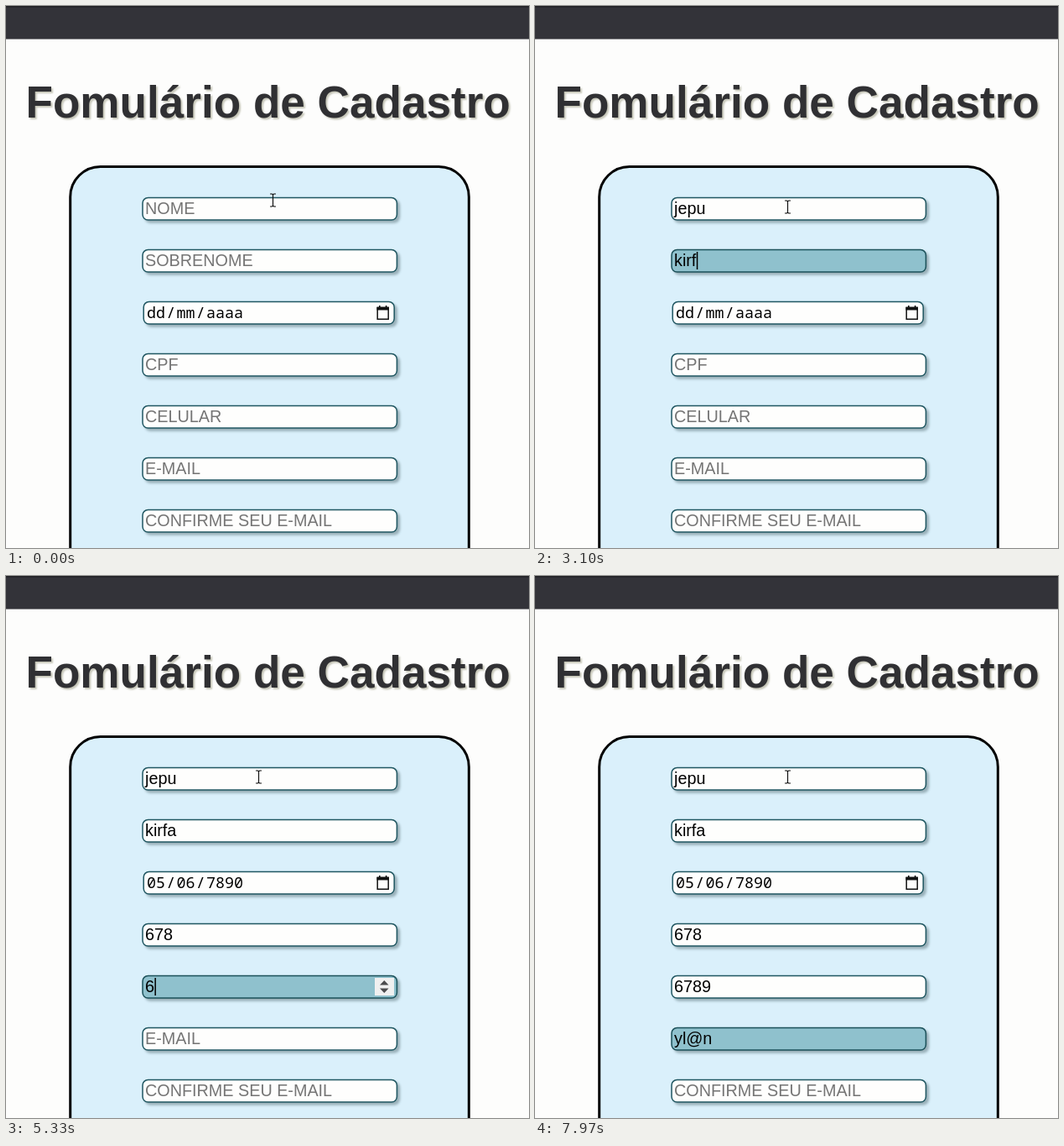
An HTML page for the animation above (8000 ms loop, 624 by 646 pixels).

```html
<!DOCTYPE html>
<html lang="pt-BR">
<head>
<meta charset="utf-8">
<title>Formulário</title>
<style>
  html, body { margin: 0; width: 100%; height: 100%; overflow: hidden; background: #fdfdfc; }
  svg { display: block; width: 624px; height: 646px; }
  text { font: 19.8px "Liberation Sans", Arial, sans-serif; white-space: pre; }
  .title { font-size: 53.1px; font-weight: bold; fill: #303033; text-shadow: 2px 2px 2px #c6c6b8; }
  .box { stroke: #1f5661; stroke-width: 1.5; fill: #fefefd; filter: drop-shadow(3px 3px 1.5px rgba(55, 80, 85, .4)); }
  .focus .box { fill: #8fc1cd; stroke: #1b5059; }
  .hint { fill: #757575; }
  .mono { font: 18.33px "Noto Sans Mono", monospace; }
  .spinner { visibility: hidden; }
  .focus .spinner { visibility: visible; }
</style>
</head>
<body>
<svg viewBox="0 0 624 646">
  <rect width="624" height="646" fill="#fdfdfc"/>
  <rect width="624" height="39.5" fill="#333339"/>
  <rect width="624" height="1.5" fill="#202024"/>
  <text class="title" x="23.5" y="132.6">Fomulário de Cadastro</text>
  <rect x="76.7" y="191.5" width="475.6" height="600" rx="36" fill="#daf0fb" stroke="#000" stroke-width="3"/>
  <g id="form"></g>
  <rect id="caret" width="1.5" height="21" fill="#000"/>
  <path id="pointer" d="M-3.5 -7.5H-1L0 -6.5L1 -7.5H3.5M0 -6.5V6.5M-3.5 7.5H-1L0 6.5L1 7.5H3.5" fill="none" stroke-width="1.2"/>
</svg>
<script>
const LOOP = 8000, ROW = 62, DATE = 2, TEXT_X = 166;
const hints = ['NOME', 'SOBRENOME', 'dd/mm/aaaa', 'CPF', 'CELULAR', 'E-MAIL', 'CONFIRME SEU E-MAIL'];
const segmentX = [168, 203.5, 239];
const form = document.getElementById('form');
const caret = document.getElementById('caret');
const pointer = document.getElementById('pointer');

function add(parent, tag, attrs, content = '') {
  const node = document.createElementNS('http://www.w3.org/2000/svg', tag);
  for (const key in attrs) node.setAttribute(key, attrs[key]);
  node.textContent = content;
  return parent.appendChild(node);
}

const fields = hints.map((hint, i) => {
  const group = add(form, 'g', { transform: `translate(0 ${228 + i * ROW})` });
  const isDate = i === DATE;
  add(group, 'rect', { class: 'box', x: isDate ? 164.2 : 163, y: .5, width: isDate ? 299 : 303.4, height: 26.6, rx: 6.5 });
  if (isDate) return { group, ...addDate(group) };
  if (i === 4) addSpinner(group);
  return { group, label: add(group, 'text', { x: TEXT_X, y: 20 }, hint) };
});

function addDate(group) {
  const mark = add(group, 'rect', { y: 1.5, height: 24.5, fill: '#0078d7' });
  const segments = segmentX.map(x => add(group, 'text', { class: 'mono', x, y: 20 }));
  for (const x of [191.3, 226.8]) add(group, 'text', { class: 'mono', x, y: 20 }, '/');
  add(group, 'path', { d: 'M443.2 7.5H456.2V21.2H443.2Z', fill: 'none', stroke: '#111', 'stroke-width': 1.5 });
  add(group, 'path', { d: 'M442.5 6.8H457V10.4H442.5ZM445 5H446.6V7H445ZM452.8 5H454.4V7H452.8Z', fill: '#111' });
  return { mark, segments };
}

function addSpinner(group) {
  const g = add(group, 'g', { class: 'spinner' });
  add(g, 'rect', { x: 440, y: 3, width: 23, height: 21, fill: '#f0f0f0' });
  add(g, 'path', { d: 'M446 11.5L451.3 6L456.5 11.5ZM446 15.5L451.3 21L456.5 15.5Z', fill: '#4b4b4d' });
}

// Each event: time, focused field, its text, active date segment
const events = [];
function type(field, word, focusAt, start, step) {
  events.push([focusAt, field, '']);
  [...word].forEach((_, n) => events.push([start + n * step, field, word.slice(0, n + 1)]));
}
type(0, 'jepu', 700, 1200, 130);
type(1, 'kirfa', 1700, 2560, 160);
events.push([3500, DATE, hints[DATE], 0]);
['00/mm/aaaa', '05/mm/aaaa', '05/00/aaaa', '05/06/aaaa', '05/06/0007', '05/06/0078', '05/06/0789', '05/06/7890']
  .forEach((text, n) => events.push([3920 + n * 75, DATE, text, [0, 1, 1, 2, 2, 2, 2, 2][n]]));
type(3, '678', 4560, 4780, 110);
type(4, '6789', 5160, 5300, 110);
type(5, 'yl@n', 6400, 6720, 230);

function drawDate(text, active) {
  const { mark, segments } = fields[DATE];
  text.split('/').forEach((part, i) => {
    segments[i].textContent = part;
    segments[i].setAttribute('fill', i === active ? '#fff' : '#000');
  });
  mark.setAttribute('visibility', active < 0 ? 'hidden' : 'visible');
  if (active >= 0) {
    mark.setAttribute('x', segmentX[active] - 1);
    mark.setAttribute('width', active === 2 ? 46 : 24.5);
  }
}

function draw(t) {
  const values = hints.map(() => '');
  values[DATE] = hints[DATE];
  let focus = -1, since = 0, segment = -1;
  for (const [time, field, text, active = -1] of events) {
    if (time > t) break;
    values[field] = text;
    [focus, since, segment] = [field, time, active];
  }
  fields.forEach(({ group, label }, i) => {
    group.setAttribute('class', i === focus ? 'focus' : '');
    if (!label) return;
    label.textContent = values[i] || hints[i];
    label.setAttribute('class', values[i] ? '' : 'hint');
  });
  drawDate(values[DATE], segment);

  const blinkOn = (t - since) % 1000 < 500;
  const showCaret = focus >= 0 && focus !== DATE && blinkOn;
  caret.setAttribute('visibility', showCaret ? 'visible' : 'hidden');
  if (showCaret) {
    const width = values[focus] ? fields[focus].label.getComputedTextLength() : 0;
    caret.setAttribute('x', TEXT_X + width + .4);
    caret.setAttribute('y', 231 + focus * ROW);
  }

  const p = Math.min(1, Math.max(0, (t - 60) / 480));
  const ease = p * p * (3 - 2 * p);
  pointer.setAttribute('transform', `translate(${318.5 - 17 * ease} ${231.5 + 8 * ease})`);
  pointer.setAttribute('stroke', focus === 0 ? '#465358' : '#111');
}

const start = performance.now();
function tick() {
  draw((performance.now() - start) % LOOP);
  requestAnimationFrame(tick);
}
tick();
</script>
</body>
</html>
```
